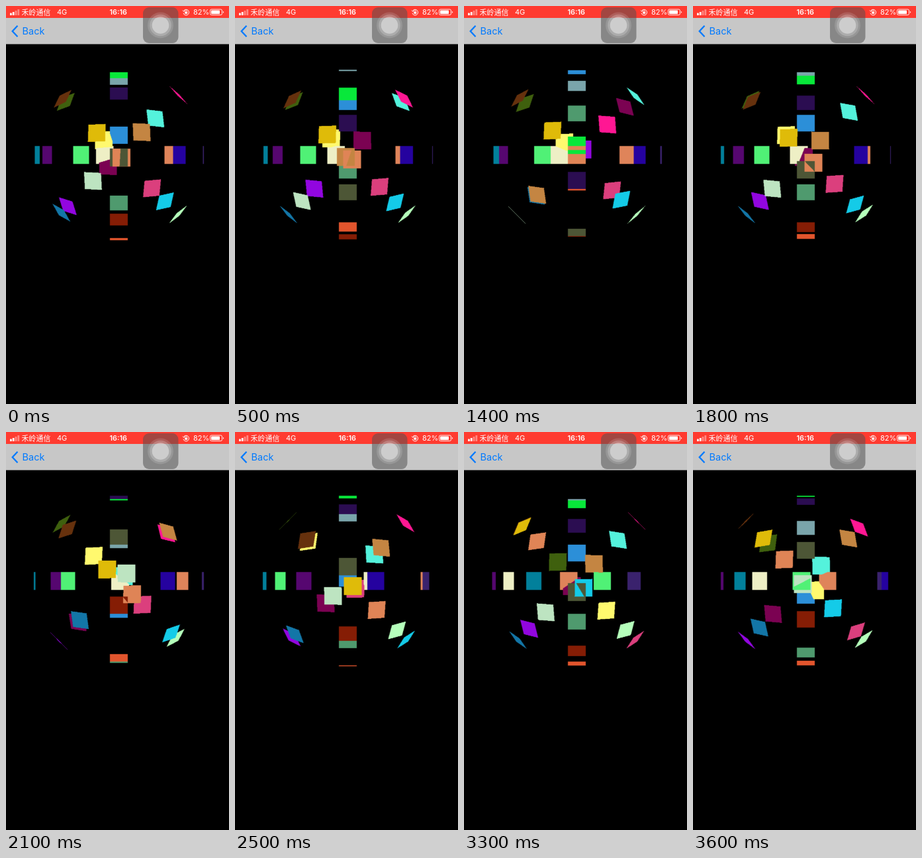
Write an HTML page with a canvas that moves like this. It is 337x600 px and loops after 3.7 s.

```html
<!DOCTYPE html>
<html lang="zh">
<head>
<meta charset="utf-8">
<title>Sphere of tiles</title>
<style>
html, body { margin: 0; width: 100%; height: 100%; overflow: hidden; background: #000; }
canvas, svg { position: absolute; left: 0; top: 0; width: 337px; height: 600px; }
text { font-family: Inter, "Noto Sans CJK SC", "Noto Sans CJK", sans-serif; fill: #fff; font-size: 11px; }
.time { font-weight: 600; font-size: 10.8px; text-anchor: middle; }
.back { font-size: 14.5px; fill: #007aff; }
</style>
</head>
<body>
<canvas id="stage" width="337" height="600"></canvas>
<svg viewBox="0 0 337 600">
  <rect width="337" height="18" fill="#ff3b30"/>
  <rect y="18" width="337" height="39.5" fill="#c7c7c7"/>
  <g fill="#fff">
    <rect x="6" y="10.5" width="2.8" height="3.5" rx=".6"/>
    <rect x="9.8" y="9" width="2.8" height="5" rx=".6"/>
    <rect x="13.6" y="7" width="2.8" height="7" rx=".6" opacity=".4"/>
    <rect x="17.4" y="5" width="2.8" height="9" rx=".6" opacity=".4"/>
  </g>
  <text x="23.5" y="13.5">禾岭通信</text>
  <text x="77" y="13.3" font-size="10.5">4G</text>
  <text class="time" x="169.7" y="13.3">16:16</text>
  <g fill="none" stroke="#fff">
    <path d="M268.6 7.2A4.3 4.3 0 1 1 268 10.6M267 6.6L268.5 8.3L270.2 7"/>
    <path d="M270.9 9V8a1.3 1.3 0 0 1 2.6 0V9" stroke-width=".8"/>
    <rect x="308.5" y="5" width="18" height="8.5" rx="2" stroke-width=".9"/>
  </g>
  <g fill="#fff">
    <rect x="270.2" y="8.7" width="4" height="3" rx=".4"/>
    <rect x="310" y="6.5" width="13" height="5.5" rx=".8"/>
    <path d="M328 7.5a2 2 0 0 1 0 3.5z"/>
  </g>
  <text x="283" y="13.3">82%</text>
  <path d="M17.5 29.8L9.7 38L17.5 46.2" fill="none" stroke="#007aff" stroke-width="2.3"/>
  <text class="back" x="24.5" y="43.2">Back</text>
  <rect x="207" y="2" width="53.5" height="54" rx="9" fill="#505050" fill-opacity=".53"/>
  <g fill="#fff" transform="translate(233.5 29)">
    <circle r="19.5" fill-opacity=".13"/>
    <circle r="16.3" fill-opacity=".2"/>
    <circle r="12.8" fill-opacity=".4"/>
  </g>
</svg>
<script>
const CX = 170.5, CY = 224.7, R = 128, HALF = 13.5;
const LOOP = 3700, STEP = 100, D = Math.SQRT1_2, RAD = Math.PI / 180;

// Four great circles: direction on screen, turning sense, swing and first angle.
const rings = [
  { ex: 0, ey: 1, dir: 1, swing: 'w', base: -46.4,
    colors: ['2b0d51', '4d5636', '851d05', 'e2552d', '4f9a6e', '2c8fd8', '7aa5ab', '08e83a'] },
  { ex: D, ey: D, dir: 1, swing: 'u', base: 2.4,
    colors: ['df8456', '14cbe8', 'b5ffbb', 'db3f7d', 'fff96e', '3f600e', '66310d', 'dfbb09'] },
  { ex: 1, ey: 0, dir: -1, swing: 'u', base: 26.4,
    colors: ['50f176', '02809b', '560770', 'eeefc5', 'df845a', '3a226d', '25029f'] },
  { ex: D, ey: -D, dir: -1, swing: 'w', base: -22.4,
    colors: ['c48542', 'bde4c1', '1376a7', '9206e0', '7b0252', '54f2dc', 'ff1793'] }
];

// Swing angles in degrees at a few moments (ms).
const moments = [0, 500, 1400, 2100, 2500, 3000, 3600];
const swings = {
  w: [0, 24.4, 63.8, -33, -11.3, 34.3, -22.8],
  u: [0, 1.6, -2.4, 10.4, 26.4, -64.4, -23.4]
};

function swingAt(list, t) {
  let i = 0;
  while (i < moments.length - 2 && t >= moments[i + 1]) i++;
  const k = (t - moments[i]) / (moments[i + 1] - moments[i]);
  return list[i] + (list[i + 1] - list[i]) * k;
}

// Depth-tested drawing at double size, so tiles may cut through each other.
const S = 2, M = 140, N = M * 2 * S;
const ctx = document.getElementById('stage').getContext('2d');
const buf = document.createElement('canvas');
buf.width = buf.height = N;
const bctx = buf.getContext('2d');
const img = bctx.createImageData(N, N);
const px = new Uint32Array(img.data.buffer);
const depth = new Float32Array(N * N);

function abgr(hex) {
  const n = parseInt(hex, 16);
  return (0xff000000 | (n & 255) << 16 | n & 0xff00 | n >> 16) >>> 0;
}

function tile(ex, ey, angle, color) {
  const sin = Math.sin(angle), cos = Math.cos(angle);
  if (Math.abs(cos) < 1e-4) return;
  const x0 = Math.floor((ex * R * sin + M - 20) * S);
  const y0 = Math.floor((ey * R * sin + M - 20) * S);
  for (let j = Math.max(0, y0); j < Math.min(N, y0 + 40 * S); j++) {
    const y = (j + 0.5) / S - M;
    for (let i = Math.max(0, x0); i < Math.min(N, x0 + 40 * S); i++) {
      const x = (i + 0.5) / S - M;
      const s = (x * ex + y * ey - R * sin) / cos;
      const q = y * ex - x * ey;
      if (Math.abs(s * ex - q * ey) > HALF || Math.abs(s * ey + q * ex) > HALF) continue;
      const z = R * cos - s * sin, at = j * N + i;
      if (z > depth[at]) {
        depth[at] = z;
        px[at] = color;
      }
    }
  }
}

function draw(t) {
  px.fill(0xff000000);
  depth.fill(-1e4);
  for (const r of rings) {
    const turn = r.base + swingAt(swings[r.swing], t);
    r.colors.forEach((c, k) => tile(r.ex, r.ey, r.dir * (turn + 48 * k) * RAD, abgr(c)));
  }
  bctx.putImageData(img, 0, 0);
  ctx.fillStyle = '#000';
  ctx.fillRect(0, 0, 337, 600);
  ctx.imageSmoothingQuality = 'high';
  ctx.drawImage(buf, CX - M, CY - M, M * 2, M * 2);
}

const start = performance.now();
let last = -1;
function tick() {
  const t = Math.floor((performance.now() - start) % LOOP / STEP) * STEP;
  if (t !== last) draw(last = t);
  requestAnimationFrame(tick);
}
tick();
</script>
</body>
</html>
```
